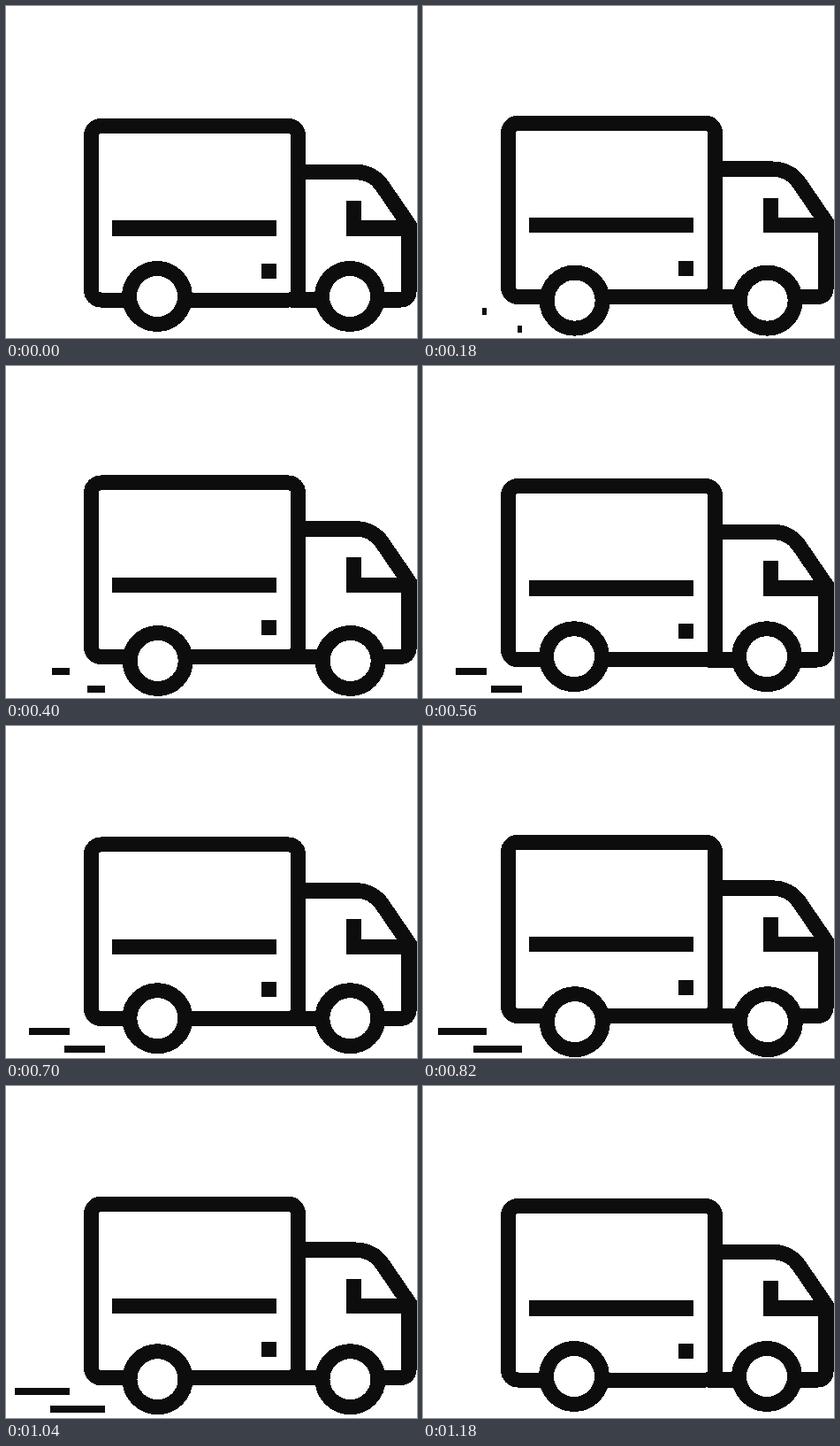
Recreate the animation shown at these times as an HTML page. Size 465 by 375 pixels, loop 2420 ms.

```html
<!DOCTYPE html>
<html lang="en">
<head>
<meta charset="utf-8">
<title>Delivery truck</title>
<style>
  html, body { margin: 0; width: 100%; height: 100%; overflow: hidden; background: #fff; }
  svg { display: block; width: 100%; height: 100%; shape-rendering: crispEdges; }
</style>
</head>
<body>
<svg viewBox="0 0 465 375">
  <g fill="#0d0d0d">
    <rect id="dashTop" y="341" height="8"/>
    <rect id="dashLow" y="361" height="8"/>
  </g>
  <g id="body" fill="none" stroke="#0d0d0d" stroke-width="17">
    <rect x="96.5" y="135.5" width="234" height="196.5" rx="11"/>
    <path d="M330.5 187.5H396C408 187.5 419 193.5 425.5 203L456 247.5V321Q456 332 445 332H322" stroke-width="17.4"/>
    <path d="M393.5 220V251H456M120 251H306" stroke-width="17.6"/>
    <path d="M289 299.5H306"/>
  </g>
  <g id="wheels" fill="#fff" stroke="#0d0d0d" stroke-width="17">
    <circle cx="171" cy="328" r="31.5"/>
    <circle cx="389" cy="328" r="31.5"/>
  </g>
</svg>
<script>
  const LOOP = 2420, STEP = 20;
  const DRIVE = 1180, HALF_BOUNCE = DRIVE / 4;
  const GROW = 1040, DASH = 62;
  const get = id => document.getElementById(id);
  const body = get('body'), wheels = get('wheels');
  const dashes = [[get('dashTop'), 72], [get('dashLow'), 112]];

  const smooth = p => {
    p = Math.min(1, Math.max(0, p));
    return p * p * (3 - 2 * p);
  };

  // 0 at rest, 1 at the height of each bounce
  function bounce(t) {
    if (t >= DRIVE) return 0;
    const phase = t % (2 * HALF_BOUNCE) / HALF_BOUNCE;
    return smooth(1 - Math.abs(1 - phase));
  }

  function render(t) {
    const b = bounce(t);
    body.setAttribute('transform', `translate(0 ${-5 * b})`);
    wheels.setAttribute('transform', `translate(${b} ${7 * b})`);
    const width = t < DRIVE ? DASH * smooth(t / GROW) : 0;
    for (const [dash, right] of dashes) {
      dash.setAttribute('x', right - width);
      dash.setAttribute('width', width);
    }
  }

  const start = performance.now();
  function tick() {
    const t = (performance.now() - start) % LOOP;
    render(Math.floor(t / STEP) * STEP);
    requestAnimationFrame(tick);
  }
  render(0);
  requestAnimationFrame(tick);
</script>
</body>
</html>
```
